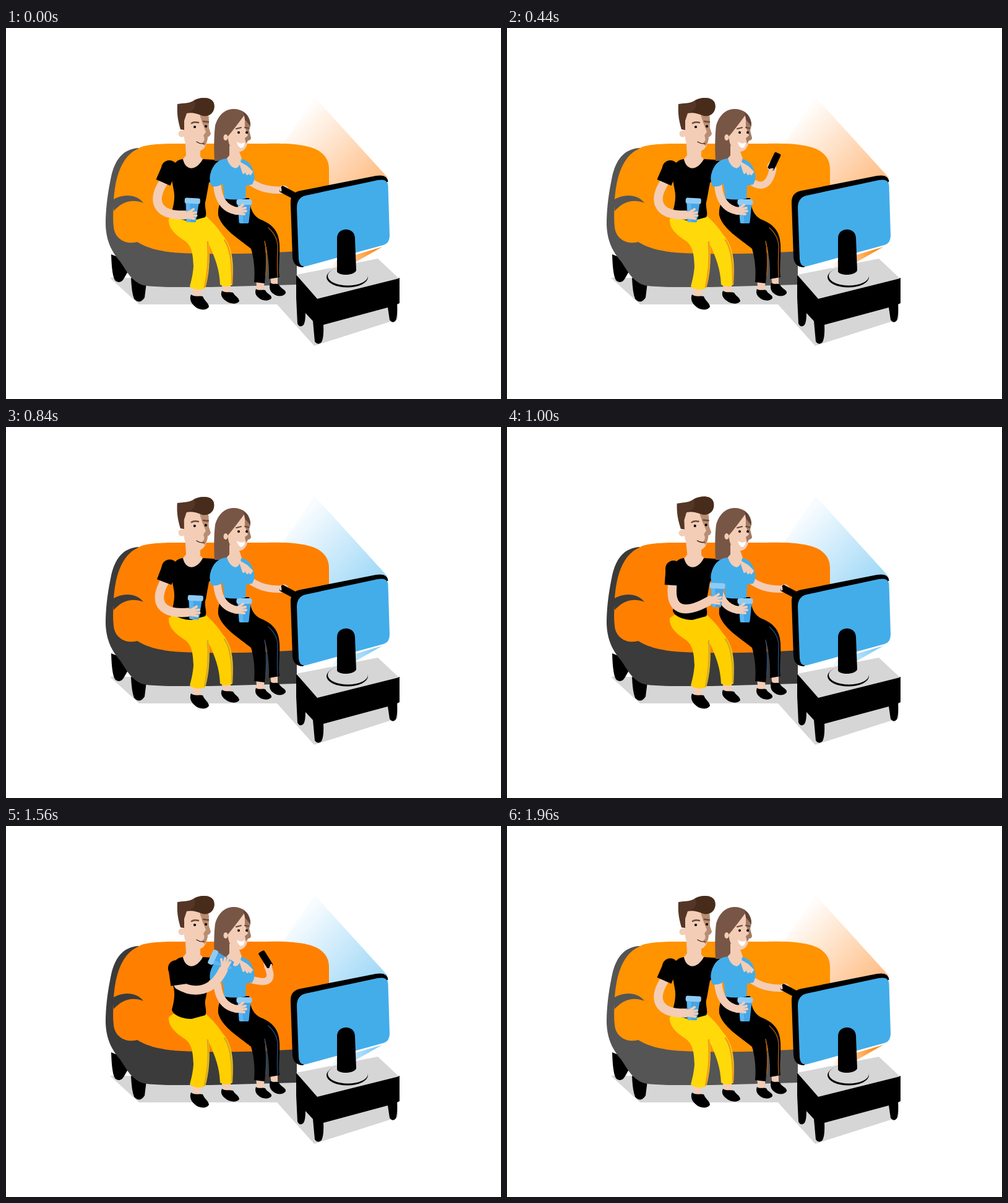
An HTML page for the animation above (2000 ms loop, 800 by 600 pixels).

```html
<!DOCTYPE html>
<html lang="en">
<head>
<meta charset="utf-8">
<title>Evening on the sofa</title>
<style>
html, body { margin: 0; width: 100%; height: 100%; overflow: hidden; background: #fff; }
svg { display: block; width: 800px; height: 600px; }
#scene { --sofa: #ff9300; --base: #555; --pants: #ffd90a; --rim: #f09a1c; --leg: #a85a14;
  --beam: #ffc08a; --beamEnd: #fffcf9; --under: #ff8c1a; }
#scene.cool { --sofa: #ff8000; --base: #3b3b3b; --pants: #ffcf00; --rim: #d3a928; --leg: #234a78;
  --beam: #a2d9f7; --beamEnd: #f8fcff; --under: #86ccf6; }
.sofa { fill: var(--sofa); }
.base { fill: var(--base); }
.skin { fill: #f3cdb6; }
.line { fill: none; stroke-linecap: round; stroke-linejoin: round; }
.limb { stroke: #f3cdb6; }
.floor { fill: #d6d6d6; }
.blue { fill: #43adea; }
</style>
</head>
<body>
<svg id="scene" viewBox="0 0 800 600">
  <defs>
    <linearGradient id="beam" gradientUnits="userSpaceOnUse" x1="592" y1="250" x2="482" y2="140">
      <stop offset="0" style="stop-color:var(--beam)"/>
      <stop offset="1" style="stop-color:var(--beamEnd)"/>
    </linearGradient>
    <linearGradient id="under" gradientUnits="userSpaceOnUse" x1="595" y1="360" x2="525" y2="388">
      <stop offset="0" style="stop-color:var(--under)"/>
      <stop offset="1" style="stop-color:var(--beamEnd)"/>
    </linearGradient>
    <g id="cup">
      <path d="M-10-11H11L8 18Q8 20 6 20H-6Q-8 20-8 18Z" fill="#45a5e8"/>
      <path d="M-8 0L-7 18Q-6 20-3 20H-1L-3-10H-10Z" fill="#5db6f0"/>
      <rect x="-12" y="-19" width="25" height="9" rx="3" fill="#8fcbf4"/>
    </g>
    <g id="hand">
      <ellipse class="skin" cx="-7" cy="9" rx="8" ry="6"/>
      <path class="line limb" stroke-width="4" d="M-8 6Q-3 4 3-1M-5 7L7 4M-4 10L8 9M-4 13L5 14"/>
    </g>
  </defs>

  <!-- floor and light -->
  <path class="floor" d="M168 404L215 447H438L498 514L633 471V430L470 405Z"/>
  <path fill="url(#beam)" d="M499 112L617 242L522 262L438 200Z"/>

  <!-- sofa -->
  <path d="M170 366L205 380L190 406Q185 414 177 409Q171 403 170 366ZM202 404L227 412L224 436Q216 448 207 438Q203 428 202 404Z"/>
  <path class="base" d="M214 194C188 196 176 214 170 240C165 264 161 290 161 318C162 345 171 362 184 377C194 391 202 410 222 416C240 420 300 419 330 419L470 415V340L300 300Z"/>
  <path class="sofa" d="M214 195C222 189 240 188 262 187H420C475 186 522 190 522 228V310L470 361C400 366 300 367 262 362C240 359 225 354 212 346C195 351 176 342 174 322C172 305 174 290 174 277C177 235 190 205 214 195Z"/>
  <path class="base" d="M172 278C190 267 212 269 222 283C205 276 188 280 174 296Z"/>

  <!-- man -->
  <g id="man">
    <path class="skin" d="M299 418L314 420L316 436H304ZM348 412L363 413V430H352Z"/>
    <path d="M299 431C306 436 312 432 318 434C321 442 328 445 328 451C323 458 311 456 305 450C299 445 296 438 299 431ZM349 425C356 429 361 426 367 428C370 434 377 436 377 442C372 448 361 446 355 441C349 437 346 431 349 425Z"/>
    <path d="M263 309C262 325 275 335 290 345C302 355 302 370 303 385C302 400 299 410 297 418C304 424 315 424 322 421C328 400 330 375 328 350C338 372 345 390 346 415C352 419 360 419 366 415C368 385 368 355 350 335C340 320 332 312 322 303L270 304Z" style="fill:var(--pants)"/>
    <path class="line" d="M326 346Q329 385 321 419M353 343Q366 360 365 413" stroke-width="2.500" style="stroke:var(--rim)"/>
    <path d="M286 212C275 213 266 222 267 240L271 262C274 275 270 290 268 297C270 306 285 312 300 312L322 306C326 298 319 289 323 278L328 250L345 240L352 214L318 212C306 230 292 228 286 212Z"/>
    <g id="head">
      <path class="skin" d="M289 170L291 206L286 212C290 232 308 231 318 212L314 208V190Z"/>
      <path class="skin" d="M286 155L292 136H320C328 142 327 156 328 162L331 171Q329 176 326 176C326 186 321 197 313 199C302 200 289 192 288 178Z"/>
      <path d="M313 140H327C329 150 327 158 328 162L331 171Q329 176 326 176C326 181 324 187 321 191L317 186Q323 181 319 174L323 168L317 153Z" fill="#b98d72"/>
      <circle class="skin" cx="284" cy="171" r="5.5"/>
      <path d="M277 123C287 121 294 123 304 117C315 111 333 111 336 122C339 135 330 144 318 142C308 138 300 136 292 138L288 150V165L282 164C278 150 276 140 277 123Z" fill="#553626"/>
      <path d="M304 117C315 111 333 111 336 122C339 135 330 144 318 142C308 138 301 136 294 137Q310 131 304 117Z" fill="#472c1c"/>
      <path class="line" d="M300 154Q304 151 311 153M319 151L327 152" stroke="#704b37" stroke-width="2.5"/>
      <path class="line" d="M308 184Q314 188 320 187" stroke="#3a2218" stroke-width="1.3"/>
      <circle cx="305" cy="160" r="2.1"/><circle cx="323" cy="159" r="2.1"/>
    </g>
  </g>

  <!-- woman -->
  <g>
    <path d="M337 215C336 195 336 175 338 158C343 140 355 130 370 131C384 132 394 141 395 155L384 190L362 211C354 216 345 215 337 215Z" fill="#785646"/>
    <path class="skin" d="M361 190V206L355 213L371 233L382 214L377 200Z"/>
    <path class="skin" d="M358 176C365 168 374 156 386 140L391 153L392 166L396 178Q395 182 391 182C390 192 385 200 377 200C368 200 360 192 359 180Z"/>
    <path d="M386 140C392 145 395 150 395 158L393 166L396 178Q395 182 391 182L388 187L386 178L391 174L386 160Z" fill="#a07a64"/>
    <path d="M384 136C391 142 395 148 395 159L386 148Z" fill="#604336"/>
    <ellipse class="skin" cx="355" cy="177" rx="3.5" ry="5"/>
    <path class="line" d="M372 163L380 161M386 161L392 162" stroke="#674638" stroke-width="2"/>
    <circle cx="376" cy="169" r="2"/><circle cx="389" cy="169" r="2"/>
    <path d="M373 184Q380 189 386 185Q385 195 379 194Q374 191 373 184Z" fill="#fff"/>

    <path class="skin" d="M404 408H418L416 426H406ZM427 402H439V417H429Z"/>
    <path d="M404 422C410 426 414 422 419 424C422 431 430 431 429 437C424 443 413 441 408 436C403 432 402 427 404 422ZM427 412C433 416 436 412 441 415C444 422 453 423 452 429C447 436 436 434 431 429C426 425 425 419 427 412Z"/>
    <path d="M348 275H393C395 292 398 303 412 310C432 318 441 330 442 350C443 370 440 390 442 403L425 406C426 380 422 360 418 343C421 370 420 395 418 413L401 411C403 390 400 370 396 357C375 340 349 325 343 303C342 290 346 285 348 275Z"/>
    <path class="line" d="M418 345Q424 370 420 400M424 323Q441 338 439 360Q438 385 439 402" stroke-width="1.4" style="stroke:var(--leg)"/>

    <path id="reach" class="line limb" stroke-width="11.500"/>
    <g id="remote">
      <ellipse class="skin" cx="-8" cy="-1" rx="8" ry="6.500"/>
      <rect x="-14" y="-5.500" width="29" height="11" rx="2.500"/>
      <path class="line limb" stroke-width="3" d="M-14 0L-12 3"/>
    </g>
    <path class="line limb" stroke-width="12.500" d="M341 250C342 273 350 293 374 296"/>
    <path class="blue" d="M357 211C344 212 334 220 330 237Q328 248 332 256Q341 258 350 252L353 276Q371 279 387 276L388 255L398 253Q403 245 401 237C398 222 392 214 380 212Q379 225 371 227Q361 225 357 211Z"/>
    <path class="line limb" stroke-width="4" d="M379 219L389 225L397 233M381 221L390 236M380 222L384 234M386 224L395 236"/>
    <use href="#cup" x="384.5" y="296"/>
    <use href="#hand" x="380" y="287"/>
  </g>

  <!-- man's drinking arm -->
  <path id="arm" class="line limb" stroke-width="14.500"/>
  <path id="sleeve" fill="none" stroke="#000" stroke-width="25"/>
  <circle id="shoulder" r="13"/>
  <g id="drink"><use href="#cup"/><use href="#hand"/></g>

  <!-- table and screen -->
  <path d="M469 399L503 436L636 404V445L632 447Q633 465 630 473Q625 479 620 472L617 452L513 480Q514 500 510 508Q504 514 499 507L496 474L484 461Q484 475 481 480Q475 486 471 478L469 436Z"/>
  <path class="floor" d="M469 399L601 373L635 405L503 438Z"/>
  <path fill="url(#under)" d="M608 354L566 378L524 389L534 376Z"/>
  <ellipse cx="551.500" cy="403" rx="33.500" ry="16.500"/>
  <ellipse class="floor" cx="552.500" cy="401" rx="32.500" ry="15.500"/>
  <path d="M460 284Q459 267 474 263.500L598 239Q616 236 617.500 248L480 387Q465 387 463 371Z"/>
  <path class="blue" d="M470 291Q470 274.500 484 271L601 246Q617 243 617.500 255L620 336Q620 348 610 351L486 385Q474 388 473 374Z"/>
  <path d="M535 340C535 321 564 321 564 340L566 392C563 401 538 401 535 394Z"/>
</svg>
<script>
const LOOP = 2000;
const get = id => document.getElementById(id);
const set = (id, name, value) => get(id).setAttribute(name, value);

const eases = {
  in: u => u ** 1.6,
  out: u => 1 - (1 - u) ** 1.6,
  both: u => u * u * (3 - 2 * u)
};

// steps: [time, pose, ease towards the next step]
function poseAt(steps, t) {
  let i = 0;
  while (i < steps.length - 2 && t >= steps[i + 1][0]) i++;
  const [t0, a, ease] = steps[i], [t1, b] = steps[i + 1];
  const u = eases[ease || 'both'](Math.min(1, Math.max(0, (t - t0) / (t1 - t0))));
  return a.map((v, k) => v + (b[k] - v) * u);
}

// bend x,y, hand x,y, remote x,y, remote angle
const aim = [415, 264, 446, 262, 456, 266, 28];
const lift = [421, 268, 430, 228, 432, 216, -64];
const back = [438, 262, 423, 227, 420, 216, -122];
const press = [
  [0, aim], [290, aim, 'in'], [440, lift, 'out'], [540, back],
  [580, back, 'in'], [630, lift, 'out'], [710, aim], [1000, aim]
];

// shoulder x,y, sleeve end x,y, two bends x,y, cup x,y, cup angle, head angle
const rest = [264, 227, 254, 250, 234, 282, 246, 304, 300, 294, 3, 0];
const raise = [269, 229, 267, 256, 262, 304, 293, 301, 339, 272, 3, -1.8];
const sip = [280, 234, 296, 249, 326, 252, 341, 238, 336, 177, -78, -1];
const lower = [275, 230, 279, 257, 305, 272, 335, 269, 348, 218, -66, 0];
const drinking = [
  [0, rest], [780, rest, 'in'], [1000, raise, 'out'], [1230, sip],
  [1400, sip, 'in'], [1560, lower, 'out'], [1740, rest], [LOOP, rest]
];

function drawReach(t) {
  const [bx, by, hx, hy, rx, ry, turn] = poseAt(press, t % 1000);
  set('reach', 'd', `M393 247Q${bx} ${by} ${hx} ${hy}`);
  set('remote', 'transform', `translate(${rx} ${ry}) rotate(${turn})`);
}

function drawDrink(t) {
  const [sx, sy, ex, ey, ax, ay, bx, by, cx, cy, turn, nod] = poseAt(drinking, t);
  const r = turn * Math.PI / 180, c = Math.cos(r), s = Math.sin(r);
  const hx = cx - 10 * c - 9 * s, hy = cy - 10 * s + 9 * c;
  set('arm', 'd', `M${ex} ${ey}C${ax} ${ay} ${bx} ${by} ${hx} ${hy}`);
  set('sleeve', 'd', `M${sx} ${sy}L${ex} ${ey}`);
  set('shoulder', 'cx', sx);
  set('shoulder', 'cy', sy);
  set('drink', 'transform', `translate(${cx} ${cy}) rotate(${turn})`);
  set('head', 'transform', `rotate(${nod} 303 200)`);
}

const start = performance.now();
function draw(now) {
  const t = Math.max(0, now - start) % LOOP;
  drawReach(t);
  drawDrink(t);
  get('scene').classList.toggle('cool', t >= 760 && t < 1760);
  requestAnimationFrame(draw);
}
draw(start);
</script>
</body>
</html>
```
